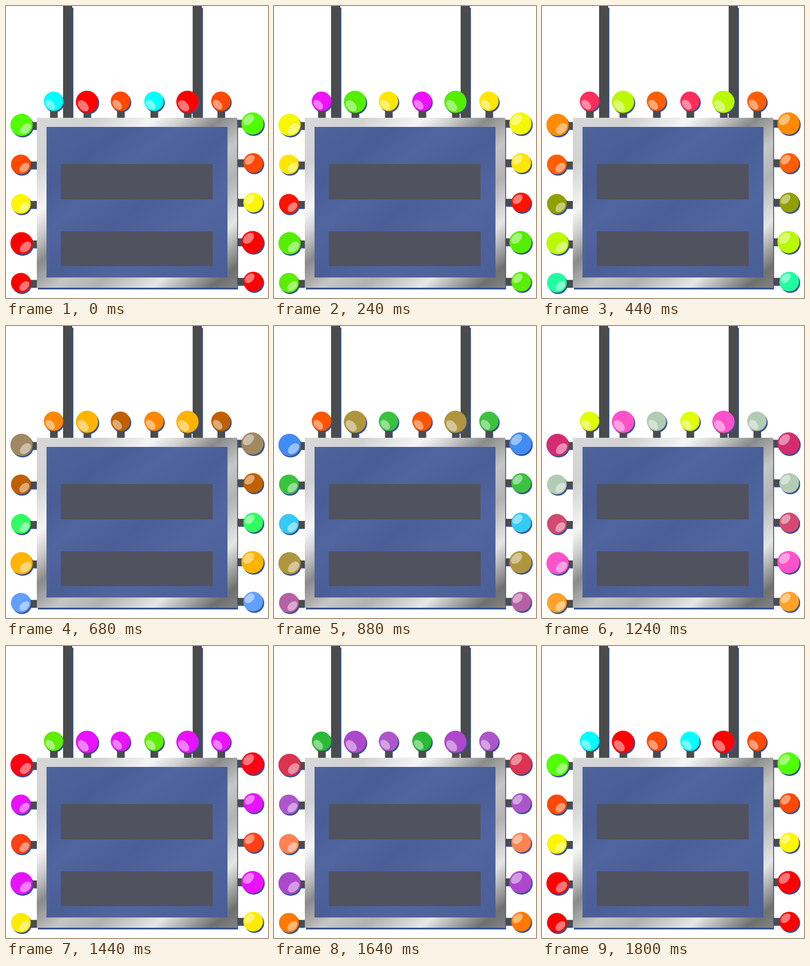
An HTML page that plays this animation: 459 px wide and 512 px high, repeating every 1.9 s.

```html
<!DOCTYPE html>
<html lang="en">
<head>
<meta charset="utf-8">
<title>Sign with coloured bulbs</title>
<style>
  html, body { margin: 0; width: 100%; height: 100%; overflow: hidden; background: #fff; }
  svg { display: block; width: 459px; height: 512px; }
  .metal { fill: #4a4b4b; }
  .shade { fill: #3a5292; }
  .slot { fill: #50525e; }
  .shine { fill: #fff; opacity: .46; }
</style>
</head>
<body>
<svg viewBox="0 0 459 512">
  <defs>
    <linearGradient id="steel" gradientUnits="userSpaceOnUse" x1="54" y1="196" x2="333" y2="547">
      <stop offset="0" stop-color="#d8d8d8"/>
      <stop offset=".15" stop-color="#d2d2d2"/>
      <stop offset=".29" stop-color="#f5f5f5"/>
      <stop offset=".36" stop-color="#d0d0d0"/>
      <stop offset=".45" stop-color="#8a8a8a"/>
      <stop offset=".56" stop-color="#c6c6c6"/>
      <stop offset=".66" stop-color="#b2b2b2"/>
      <stop offset=".8" stop-color="#e6e6e6"/>
      <stop offset=".94" stop-color="#707070"/>
      <stop offset="1" stop-color="#808080"/>
    </linearGradient>
    <linearGradient id="glass" gradientUnits="userSpaceOnUse" x1="71" y1="212" x2="318" y2="523">
      <stop offset="0" stop-color="#4f649d"/>
      <stop offset=".22" stop-color="#495e96"/>
      <stop offset=".36" stop-color="#5166a0"/>
      <stop offset=".52" stop-color="#4a5f98"/>
      <stop offset=".72" stop-color="#5166a0"/>
      <stop offset="1" stop-color="#4a5f97"/>
    </linearGradient>
  </defs>
  <path class="shade" d="M102 3h16v193h-16zM329 3h16v193h-16z"/>
  <path class="metal" d="M100 0h16v196h-16zM327 0h16v196h-16z"/>
  <g id="bulbs"></g>
  <path class="shade" d="M56 199h350.5v298H56z"/>
  <path fill="url(#steel)" d="M54 196h351v298H54z"/>
  <path fill="url(#glass)" d="M71 212h317v264H71z"/>
  <path class="slot" d="M96 277h266v62H96zM96 395h266v61H96z"/>
</svg>
<script>
  const TICK = 40, LOOP = 1900;

  // Colour tracks: tick and colour, stepped evenly from one to the next.
  const tracks = {
    a: '0 00ffff 6 f010fc 11 ff2d5a 15 ff9b00 20 ff6600 25 ff3800 30 ffff00 35 69ff00 40 33aa00 45 00ffff',
    b: '0 ff0000 5 40ea00 10 aaff00 15 ffe000 20 ff7200 25 38cd9a 30 ff66be 35 fc00ff 40 995aff 45 ff0000',
    c: '0 ff4800 6 ffe600 11 ff5e00 15 ff3a00 20 629900 25 00ffa0 30 a0ffa0 35 fc00ff 40 995aff 45 ff4800',
    d: '0 50ff00 6 f5f800 10 ff8e00 15 ff7800 20 11a0f0 26 a060ff 35 ff0000 40 ff0064 45 50ff00',
    e: '0 fff600 6 ff1200 10 a08800 15 50ff00 20 00fff0 26 9f60ff 35 ff3600 40 ff6666 45 fff600',
    f: '0 ff0000 6 5aee00 11 20ffa0 17 60a0ff 26 ff2d5c 35 ffff00 40 ff9900 45 ff0000'
  };

  function keyframes(track) {
    const parts = track.split(' ');
    const keys = [];
    for (let i = 0; i < parts.length; i += 2) {
      const tick = +parts[i], next = +parts[i + 2];
      keys.push({
        offset: tick * TICK / LOOP,
        fill: '#' + parts[i + 1],
        easing: next ? `steps(${next - tick}, end)` : 'linear'
      });
    }
    // The last colour rests until the loop restarts.
    keys.push({ offset: 1, fill: keys[keys.length - 1].fill });
    return keys;
  }

  const layer = document.getElementById('bulbs');

  function add(tag, attrs) {
    const el = document.createElementNS('http://www.w3.org/2000/svg', tag);
    for (const name in attrs) el.setAttribute(name, attrs[name]);
    return layer.appendChild(el);
  }

  // turn: 0 for the left side, 90 for the top, 180 for the right side
  function bulb(track, cx, cy, r, turn) {
    const place = (dx, dy) => `translate(${cx + dx} ${cy + dy}) rotate(${turn})`;
    const bend = turn === 90 ? 0 : turn ? -.5 : 1;
    const socket = { x: 10, y: -6, width: (turn === 90 ? 29 : turn ? 28 : 28) - 10, height: 12 };
    add('rect', { ...socket, class: 'shade', transform: place(1.5, bend + 2) });
    add('circle', { cx: cx + 2, cy: cy + 2.5, r, class: 'shade' });
    add('rect', { ...socket, class: 'metal', transform: place(0, bend) });
    const light = add('circle', { cx, cy, r });
    light.animate(keyframes(tracks[track]), { duration: LOOP, iterations: Infinity });
    const k = r / 19.5;
    add('ellipse', {
      rx: 11.5 * k, ry: 7.5 * k, class: 'shine',
      transform: `${place(0, 0)} translate(${7 * k} ${6.5 * k}) rotate(-43)`
    });
  }

  const size = track => 'bd'.includes(track) ? 19.5 : 17.3;

  [...'abcabc'].forEach((track, i) => {
    const big = track === 'b';
    bulb(track, 83.2 + i * 58.65, big ? 168 : 167, big ? 19.5 : 17, 90);
  });

  [...'dcebf'].forEach((track, i) => {
    const r = size(track), inset = r > 19 ? 27.2 : 26;
    bulb(track, inset, 208.5 + i * 69.2, r, 0);
    bulb(track, 459 - inset, 206 + i * 69.3, r, 180);
  });
</script>
</body>
</html>
```
